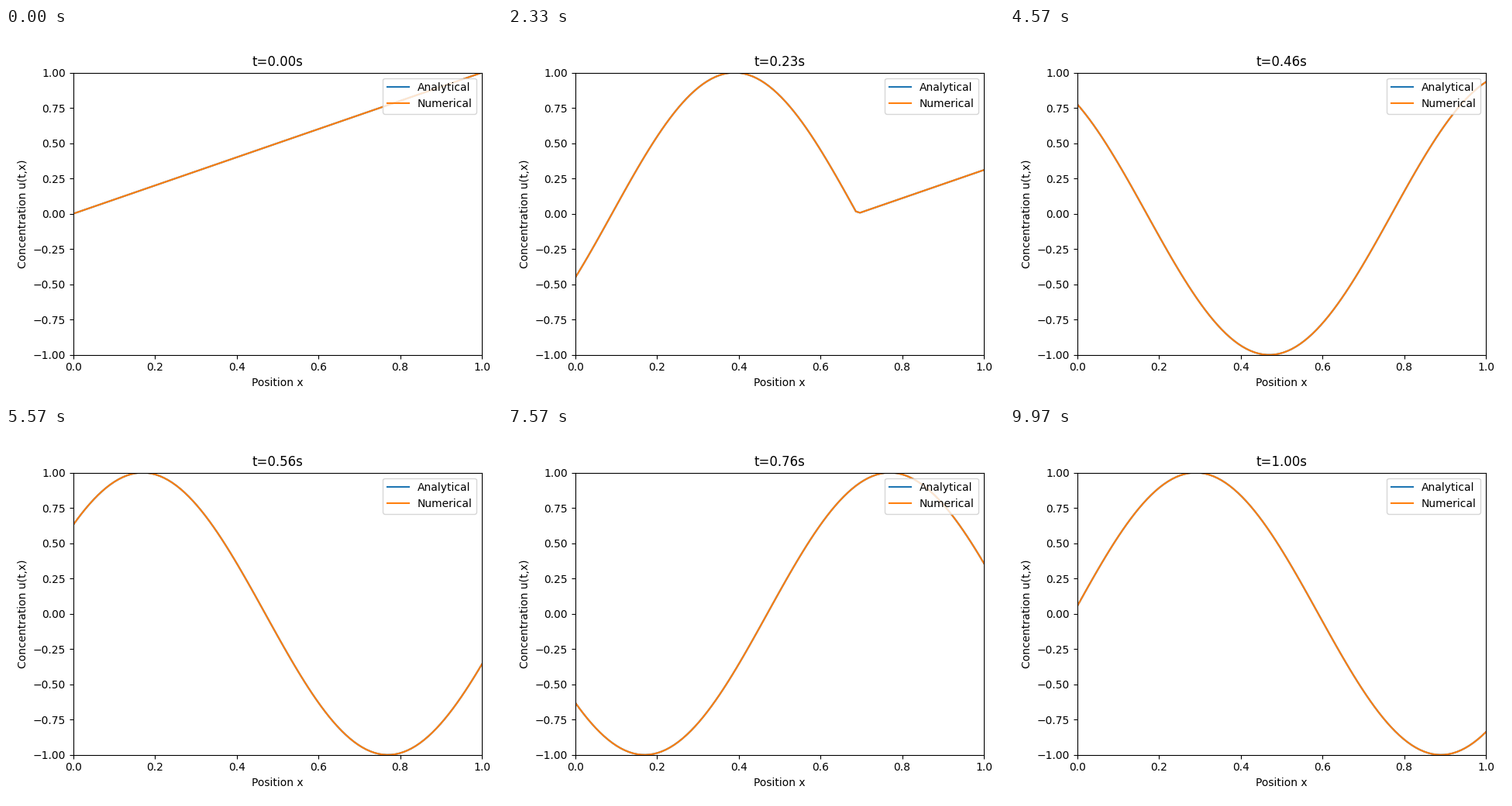
A matplotlib script for the animation above (10000 ms loop, 640x480 px).

```python
import numpy as np
import matplotlib.pyplot as plt
from matplotlib.animation import FuncAnimation

FRAMES = 300
LOOP_MS = 10000
SPEED = 3.0
OMEGA = 5 * np.pi

x = np.linspace(0, 1, 100)


def concentration(t):
    """Ramp carried to the right, followed by a sine wave fed in at x = 0."""
    ahead = x - SPEED * t
    return np.where(ahead >= 0, ahead, np.sin(-OMEGA * ahead / SPEED))


plt.rcParams["font.family"] = "DejaVu Sans"
fig, ax = plt.subplots(figsize=(6.4, 4.8), dpi=100)
lines = [ax.plot(x, concentration(0), label=name)[0]
         for name in ("Analytical", "Numerical")]
title = ax.set_title("t=0.00s")
ax.set(xlim=(0, 1), ylim=(-1, 1),
       xlabel="Position x", ylabel="Concentration u(t,x)")
ax.legend(loc="upper right")
fig.tight_layout()
fig.subplots_adjust(top=0.88)


def update(frame):
    t = frame / FRAMES
    u = concentration(t)
    for line in lines:
        line.set_ydata(u)
    title.set_text(f"t={t:.2f}s")
    return [*lines, title]


anim = FuncAnimation(fig, update, frames=FRAMES, interval=LOOP_MS / FRAMES,
                     repeat=True, repeat_delay=0)
plt.show()
```
